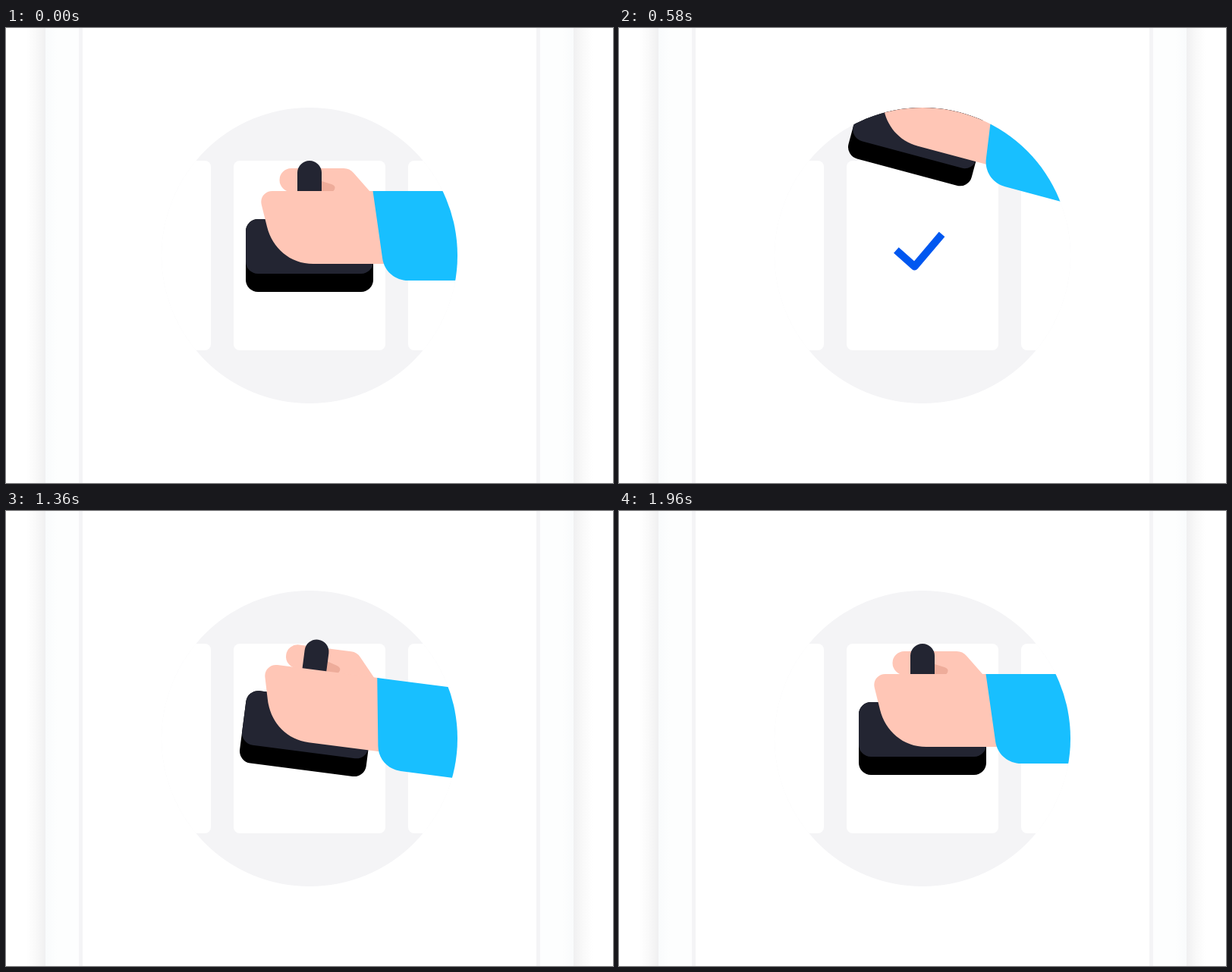
An HTML page for the animation above (2.36 s loop, 800 px wide and 600 px high).

```html
<!DOCTYPE html>
<html lang="en">
<head>
<meta charset="utf-8">
<title>Stamp</title>
<style>
  html, body { margin: 0; width: 100%; height: 100%; overflow: hidden; background: #fff; }
  svg { display: block; width: 100%; height: 100%; }
</style>
</head>
<body>
<svg viewBox="0 0 800 600">
  <defs>
    <clipPath id="disc"><circle cx="400" cy="300" r="195"/></clipPath>
    <linearGradient id="shade">
      <stop offset="0" stop-color="#fff"/>
      <stop offset=".5" stop-color="#f9f9f9"/>
      <stop offset="1" stop-color="#f0f0f1"/>
    </linearGradient>
    <linearGradient id="rim">
      <stop offset="0" stop-color="#f9fbfc"/>
      <stop offset=".35" stop-color="#fdfefe"/>
    </linearGradient>
    <g id="side">
      <rect x="27" width="25" height="600" fill="url(#shade)"/>
      <rect x="52" width="44" height="600" fill="url(#rim)"/>
      <rect x="96" width="5" height="600" fill="#f4f4f6"/>
    </g>
    <rect id="paper" y="175" width="200" height="250" rx="8" fill="#fff"/>
  </defs>

  <use href="#side"/>
  <use href="#side" transform="matrix(-1 0 0 1 800 0)"/>

  <g clip-path="url(#disc)">
    <rect x="200" y="100" width="400" height="400" fill="#f4f4f6"/>
    <use href="#paper" x="70"/>
    <use href="#paper" x="300"/>
    <use href="#paper" x="530"/>
    <path id="check" d="M372.3 293 396.5 314.5 432.5 272" fill="none"
      stroke="#0057f0" stroke-width="10" stroke-linejoin="round"/>
    <g id="hand">
      <rect x="316" y="252" width="168" height="96" rx="16"/>
      <rect x="316" y="252" width="168" height="72" rx="16" fill="#232532"/>
      <path d="M376 185H445Q453 185 458 191L480 216H376A15 15 0 0 1 376 185Z" fill="#ffc6b6"/>
      <path d="M416 202 429 206Q434 208 433.5 211 433 216 427 216H416Z" fill="#eeac9a"/>
      <path d="M384 216V191A16 16 0 0 1 416 191V216Z" fill="#232532"/>
      <path d="M351 215H486L499 311H405C374 311 351 290 344 262L337 234C334 224 341 215 351 215Z" fill="#ffc6b6"/>
      <path d="M483.5 215H650V333H530C512 333 498 320 496 303Z" fill="#18bfff"/>
    </g>
  </g>
</svg>
<script>
const LOOP = 2360, STEP = 20;
const hand = document.getElementById('hand');
const check = document.getElementById('check');

// Damped spring from 0 to 1; ms since release, angular speed, damping ratio
function spring(ms, w, z) {
  if (ms <= 0) return 0;
  const t = ms / 1000, r = Math.sqrt(1 - z * z), a = w * r * t;
  return 1 - Math.exp(-z * w * t) * (Math.cos(a) + z / r * Math.sin(a));
}

function slide(t) {
  const p = Math.min(1, Math.max(0, (t - 550) / 290));
  return p * p * (3 - 2 * p);
}

function draw(now) {
  const t = Math.floor(now % LOOP / STEP) * STEP;
  const up = t - 7, down = t - 1242;
  const lift = spring(up, 17.7, .577) - spring(down, 22.2, .55);
  const tilt = spring(up, 17.45, .5) - spring(down, 14.3, .98);
  hand.setAttribute('transform',
    `translate(0 ${-140 * lift}) rotate(${15 * tilt} 458 261.5)`);
  // A fresh mark waits under the stamp for the next lift
  check.setAttribute('transform', `translate(${t < 1600 ? -232 * slide(t) : 0} 0)`);
  requestAnimationFrame(draw);
}
requestAnimationFrame(draw);
</script>
</body>
</html>
```
